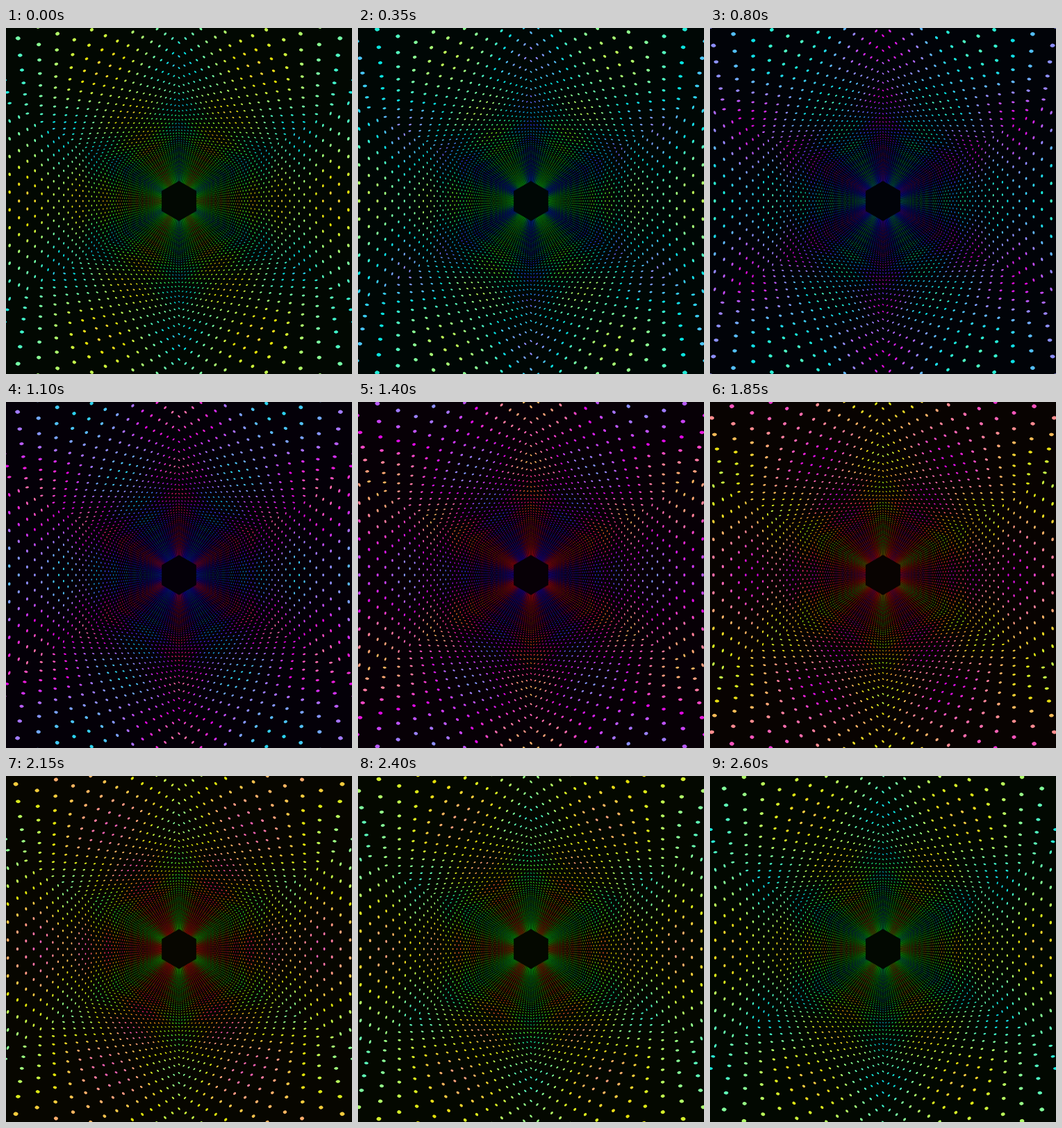
Recreate the animation shown at these times as an HTML page with a canvas. Size 498 px wide and 498 px high, loop 2650 ms.

```html
<!DOCTYPE html>
<html lang="en">
<head>
<meta charset="utf-8">
<title>Hexagonal dot tunnel</title>
<style>
  html, body { margin: 0; height: 100%; overflow: hidden; background: #000; }
  canvas { display: block; }
</style>
</head>
<body>
<canvas id="stage" width="498" height="498"></canvas>
<script>
const ctx = document.getElementById('stage').getContext('2d');
const TAU = Math.PI * 2;
const LOOP = 2650, STEP = 50;
const CENTER = 249;
const DEPTH = 4150;           // wall distance in pixels = DEPTH / ring depth
const NEAR = 11, FAR = 166;
const RINGS_PER_LOOP = 10;
const DOTS = 11;              // dots along each wall
const SIDE = 2 / Math.sqrt(3);

const walls = Array.from({ length: 6 }, (_, k) => [Math.cos(k * TAU / 6), Math.sin(k * TAU / 6)]);

// Low gamma gives pale blends, high gamma deep primaries.
function color(hue, gamma, alpha) {
  const channel = shift =>
    Math.round(255 * (0.5 + 0.5 * Math.cos((hue - shift) * TAU / 360)) ** gamma);
  return `rgba(${channel(0)},${channel(120)},${channel(240)},${alpha})`;
}

function drawRing(ring, depth, t) {
  const dist = DEPTH / depth;
  const across = 0.4 + 0.0083 * dist;
  const along = 0.4 + 0.1 * dist / depth;
  const alpha = Math.min(1, dist / 100);
  const gamma = 0.42 + 2.3 * (1 - Math.min(1, dist / 140));
  const wave = 25 * (1 - Math.cos((ring - 8.8) * TAU / 10));

  for (let i = 0; i < DOTS; i++) {
    const v = (i + (ring % 2 ? 0 : 0.5)) / DOTS - 0.5;
    const slope = SIDE * v;
    const hue = 360 * t + 42 + wave + 52 * (1 - Math.cos(TAU * v));
    ctx.fillStyle = color(hue, gamma, alpha);
    ctx.beginPath();
    for (const [c, s] of walls) {
      const rx = c - s * slope, ry = s + c * slope;
      ctx.setTransform(-s * across, c * across, rx * along, ry * along,
        CENTER + rx * dist, CENTER + ry * dist);
      ctx.moveTo(1, 0);
      ctx.arc(0, 0, 1, 0, TAU);
    }
    ctx.fill();
  }
}

function draw(t) {
  ctx.setTransform(1, 0, 0, 1, 0, 0);
  ctx.fillStyle = '#000';
  ctx.fillRect(0, 0, 498, 498);
  ctx.fillStyle = color(360 * t + 120, 1, 0.03);
  ctx.fillRect(0, 0, 498, 498);
  // The flight speeds up and slows down slightly over the loop.
  const travel = RINGS_PER_LOOP * t - 0.06 - 0.1 * Math.sin(TAU * t - 0.4);
  for (let ring = Math.floor(FAR + travel); ring - travel > NEAR; ring--) {
    drawRing(ring, ring - travel, t);
  }
}

let shown = -1;
function tick() {
  const step = Math.floor(performance.now() % LOOP / STEP);
  if (step !== shown) draw((shown = step) * STEP / LOOP);
  requestAnimationFrame(tick);
}
tick();
</script>
</body>
</html>
```
